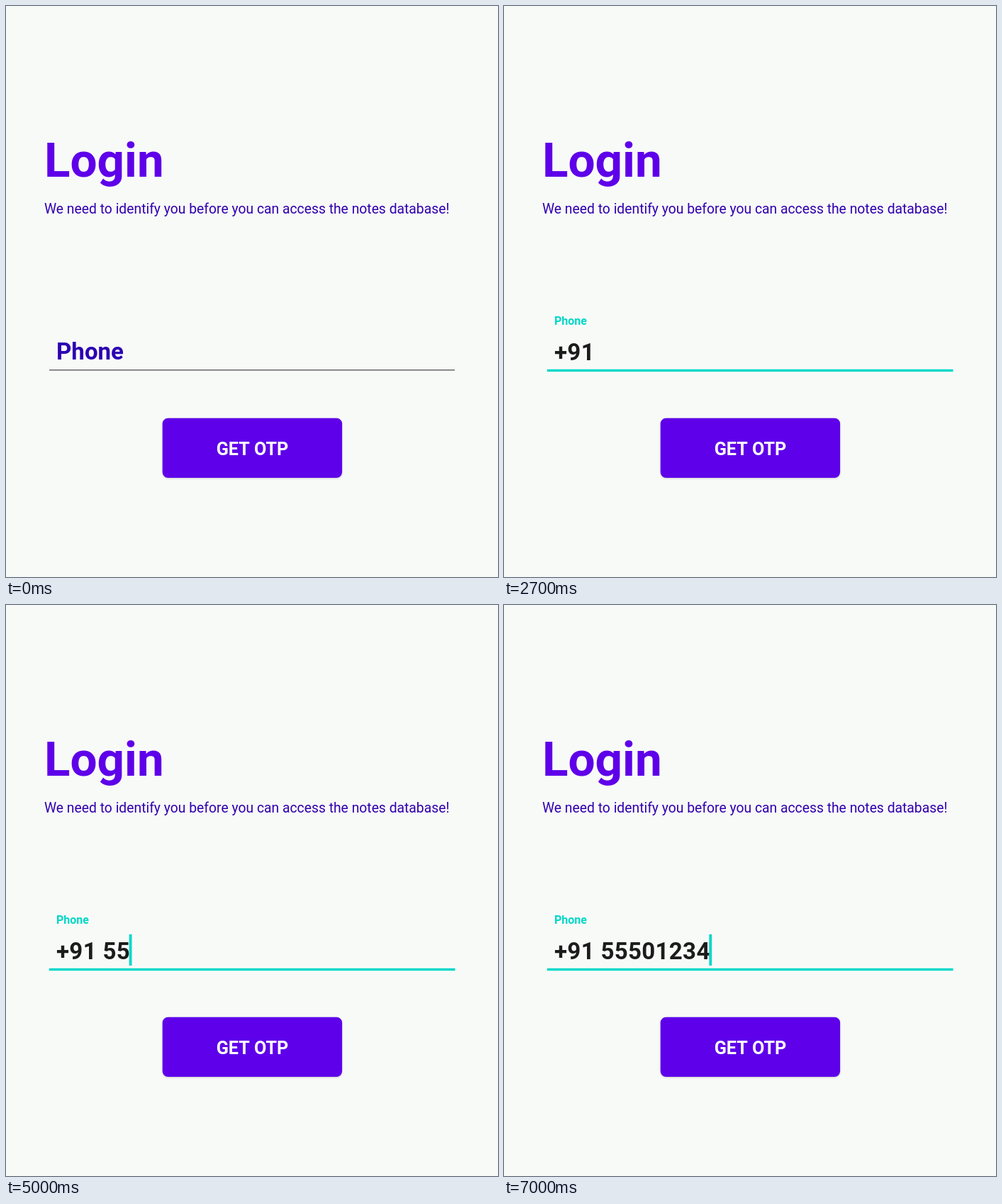
An HTML page with a canvas that plays this animation: 694 px wide and 806 px high, repeating every 7.1 s.

```html
<!DOCTYPE html>
<html lang="en">
<head>
<meta charset="utf-8">
<title>Login</title>
<style>
  html, body { margin: 0; height: 100%; overflow: hidden; background: #f8faf8; }
  canvas { display: block; }
</style>
</head>
<body>
<canvas id="stage" width="694" height="806"></canvas>
<script>
const ctx = document.getElementById('stage').getContext('2d');

const LOOP = 7100, STEP = 100, FOCUS = 1200, FLOAT = 167;
const KEYS = [4500, 4800, 5200, 5400, 5600, 6000, 6400, 6700];
const PREFIX = '+91 ', DIGITS = '55501234';
const PURPLE = '#5e00e9', INDIGO = [44, 0, 178], TEAL = [0, 216, 200];
const FIELD_X = 71;

const rgb = c => `rgb(${c.map(Math.round).join()})`;
const mix = (a, b, k) => a + (b - a) * k;

function text(str, x, y, weight, size, color, spacing = 0) {
  ctx.font = `${weight} ${size}px Roboto, sans-serif`;
  ctx.letterSpacing = `${spacing}px`;
  ctx.fillStyle = color;
  ctx.fillText(str, x, y);
  return ctx.measureText(str).width;
}

function rect(x, y, w, h, color) {
  ctx.fillStyle = color;
  ctx.fillRect(x, y, w, h);
}

function button() {
  ctx.save();
  ctx.shadowColor = 'rgba(0, 0, 0, .18)';
  ctx.shadowBlur = 3;
  ctx.shadowOffsetY = 1;
  ctx.fillStyle = PURPLE;
  ctx.beginPath();
  ctx.roundRect(220.7, 581.7, 253.4, 84.3, 8);
  ctx.fill();
  ctx.restore();
  ctx.textAlign = 'center';
  text('GET OTP', 347.5, 634, 600, 25.2, '#fff');
  ctx.textAlign = 'left';
}

function field(t) {
  const focused = t >= FOCUS;
  const p = Math.min(1, Math.max(0, (t - FOCUS) / FLOAT));
  const k = p * p * (3 - 2 * p);
  const labelColor = rgb(INDIGO.map((c, i) => mix(c, TEAL[i], k)));
  text('Phone', FIELD_X, mix(499, 449.5, k), 700, mix(33.1, 16, k), labelColor);

  if (!focused) {
    rect(61, 513, 572, 1.7, '#777');
    return;
  }
  rect(60.8, 512.8, 572.7, 3.4, rgb(TEAL));

  const typed = KEYS.filter(key => key <= t);
  const value = PREFIX + DIGITS.slice(0, typed.length);
  const width = text(value, FIELD_X, 500, 700, 33.1, '#1c1c1c', 0.3);

  // The caret blinks once a second, restarting with each key
  const since = t - (typed.at(-1) ?? FOCUS);
  if (since % 1000 < 500) rect(FIELD_X + width - 1.3, 464.8, 3.8, 44.2, rgb(TEAL));
}

function draw(now) {
  const t = Math.floor(now % LOOP / STEP) * STEP;
  rect(0, 0, 694, 806, '#f8faf8');
  text('Login', 54, 241, 700, 67.4, PURPLE);
  text('We need to identify you before you can access the notes database!',
    54, 293, 400, 19.32, '#3100af');
  field(t);
  button();
  requestAnimationFrame(draw);
}
requestAnimationFrame(draw);
</script>
</body>
</html>
```
